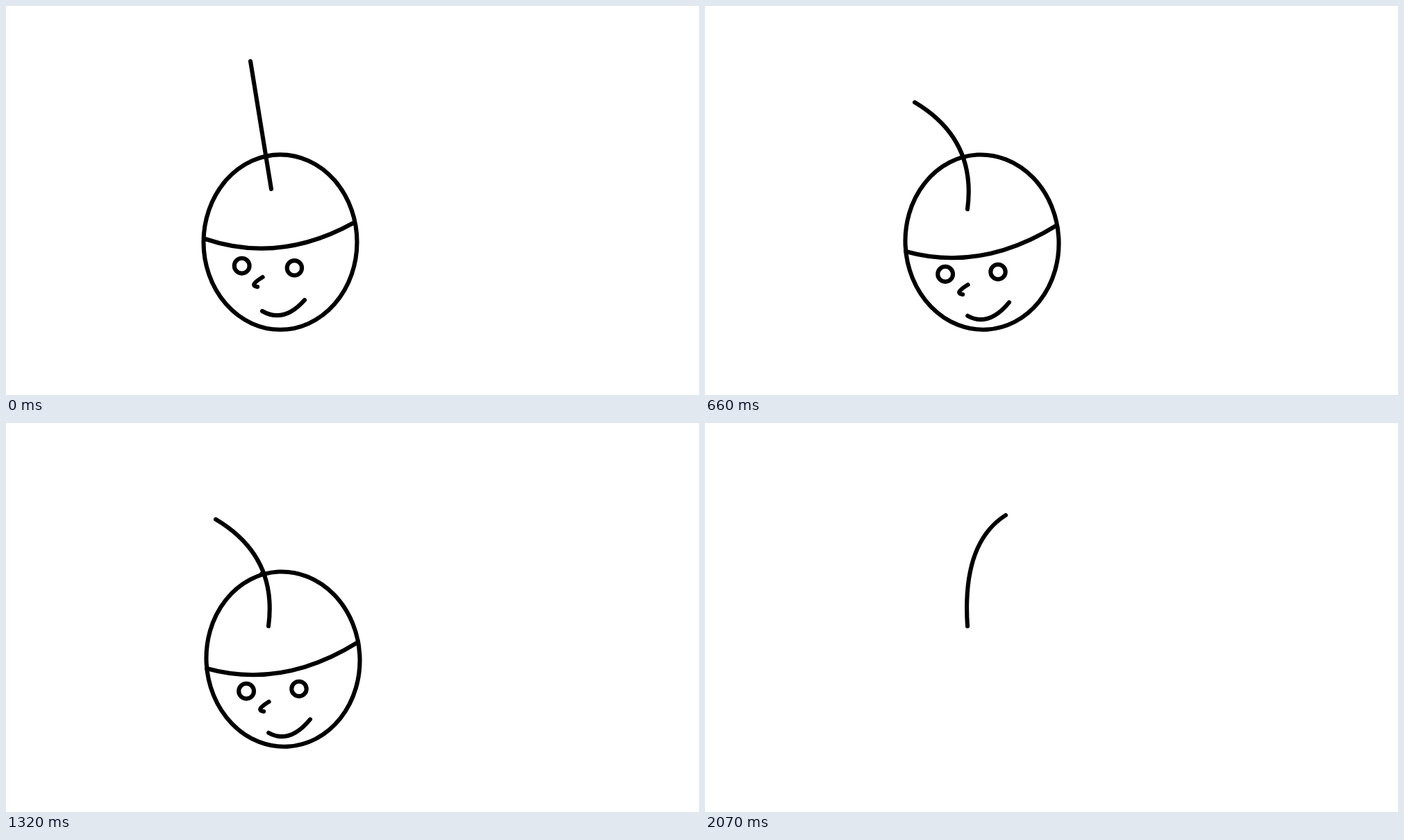
Write an HTML page that moves like this. It is 998 px wide and 561 px high and loops after 2130 ms.

```html
<!DOCTYPE html>
<html lang="en">
<head>
<meta charset="utf-8">
<title>Bouncing stem</title>
<style>
  html, body { margin: 0; width: 100%; height: 100%; overflow: hidden; background: #fff; }
  svg { display: block; width: 100vw; height: 100vh; }
  svg * { fill: none; stroke: #000; stroke-width: 6.1; stroke-linecap: round; stroke-linejoin: round; }
  #smudge { stroke-width: 2.5; }
</style>
</head>
<body>
<svg viewBox="0 0 998 561">
  <g id="face">
    <ellipse id="head" rx="110.5" ry="126.2"/>
    <path id="hat"/>
    <circle id="eyeL" r="10.9"/>
    <circle id="eyeR" r="10.7"/>
    <path id="nose" d="M0 0Q-13 8 -12.5 11Q-12 13.5 -7.5 14"/>
    <path id="mouth"/>
    <path id="smudge" d="M365 219l2 -3l2 3l2 -4l1 4"/>
  </g>
  <path id="stem"/>
</svg>
<script>
const LOOP = 2130, STEP = 30;
const el = id => document.getElementById(id);

// The stiff stem sinks with the head, then swings
const stiff = ['M382 264L352 79.5', 'M382 274L346.5 91.5', 'M378 293L341 109'];
const swing = [[540, 341], [660, 302], [690, 290], [990, 474], [1050, 433],
               [1320, 302], [1350, 290], [1740, 433], [1800, 474], [1860, 433]];

function tipAt(t) {
  const i = swing.findIndex(key => t <= key[0]);
  if (i < 0) return swing[swing.length - 1][1];
  const [t0, x0] = swing[i - 1], [t1, x1] = swing[i];
  return x0 + (x1 - x0) * (t - t0) / (t1 - t0);
}

// The tip follows a parabola; the control point leans the other way
function bentStem(t) {
  const d = tipAt(t) - 371;
  return `M378 293Q${380 - 0.164 * d} ${182 - 0.145 * d} ${371 + d} ${108 + 0.0065 * d * d}`;
}

function place(id, x, y, turn = 0) {
  el(id).setAttribute('transform', `translate(${x} ${y}) rotate(${turn})`);
}

function curve(id, d) {
  el(id).setAttribute('d', d);
}

// n counts how often the face has nodded
function drawFace(n) {
  place('head', 395 + 2 * n, 340.6, -1.5 * n);
  place('eyeL', 339.7 + 3.2 * n, 374.7 + 6 * n);
  place('eyeR', 415.4 + 3.3 * n, 377.8 + 2.8 * n);
  place('nose', 369.6 + 4.5 * n, 391 + 5.5 * n);
  curve('hat', `M${287 + n} ${336 + 9 * n}Q${393.5 + 2 * n} ${372 + 6 * n} ${500 + 3 * n} ${313 + 1.8 * n}`);
  curve('mouth', `M${369 + 4.6 * n} ${440 + 3.4 * n}Q${400 + 4.2 * n} ${458 + 2.8 * n} ${430 + 4 * n} ${424 + 1.7 * n}`);
}

function draw(now) {
  const t = Math.floor((now % LOOP) / STEP) * STEP;
  const n = t < 270 ? 0 : t < 420 ? 1 : 2;
  drawFace(n);
  curve('stem', t < 570 ? stiff[n] : bentStem(t));
  el('smudge').style.display = t < 690 ? 'none' : '';
  el('face').style.display = t < 2070 ? '' : 'none';
}

const start = performance.now();
function tick() {
  draw(performance.now() - start);
  requestAnimationFrame(tick);
}
tick();
</script>
</body>
</html>
```
